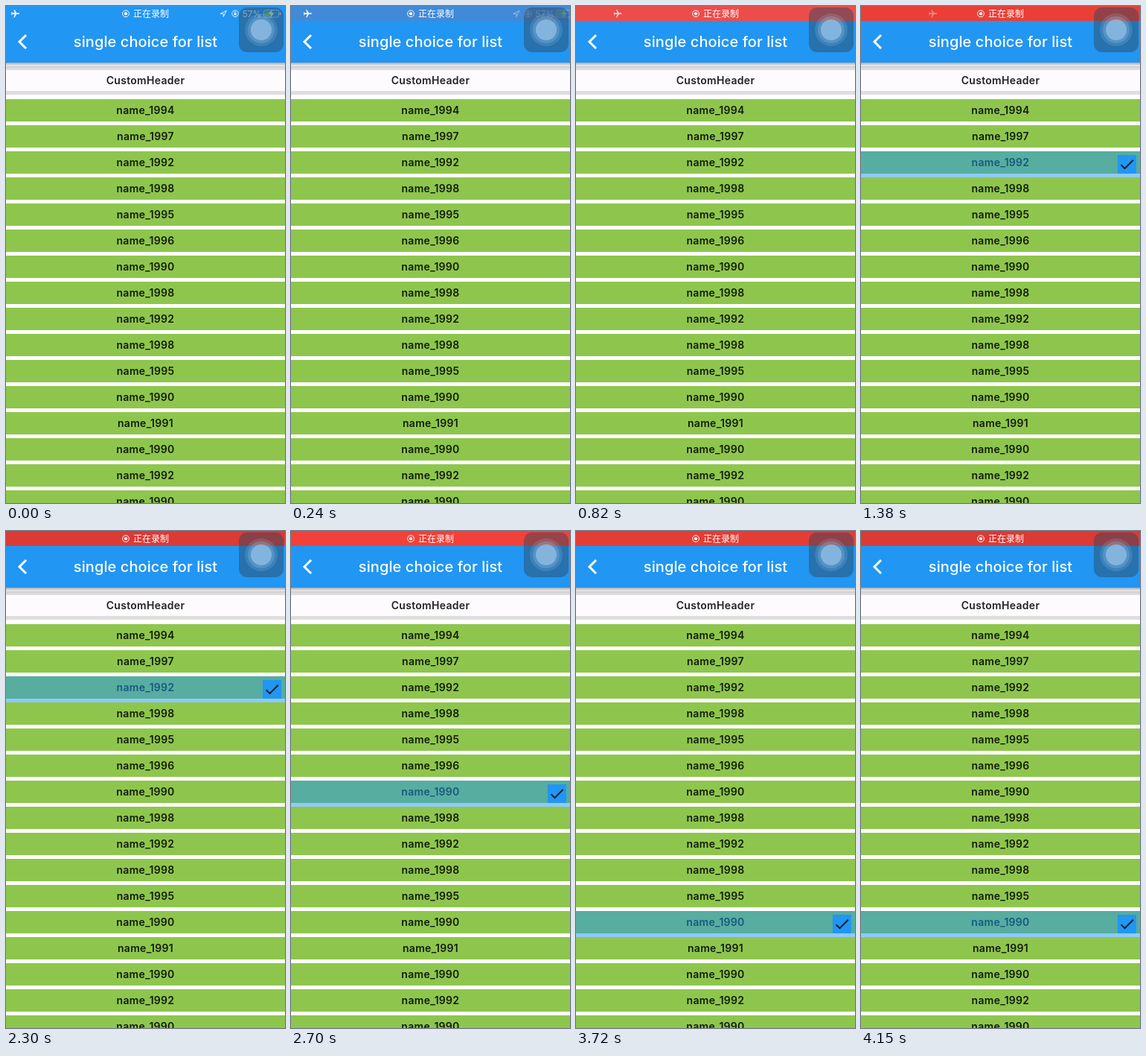
Write an HTML page that moves like this. It is 375 px wide and 667 px high and loops after 4.2 s.

```html
<!DOCTYPE html>
<html lang="en">
<head>
<meta charset="utf-8">
<title>single choice for list</title>
<style>
  html, body { margin: 0; width: 100%; height: 100%; overflow: hidden; background: #fff; }
  svg { display: block; width: 375px; height: 667px; }
  text { font-family: Inter, Roboto, sans-serif; text-anchor: middle; }
  .item { font-size: 14px; font-weight: 600; letter-spacing: .3px; fill: rgba(0, 0, 0, .87); }
  .title { font-size: 20px; font-weight: 500; letter-spacing: .08px; fill: #fff; }
  .rec { font: 12px "Noto Sans CJK SC", "Noto Sans CJK", sans-serif; fill: #fff; }
  .pct { font-size: 12px; fill: #fff; }
</style>
</head>
<body>
<svg viewBox="0 0 375 667">
  <defs>
    <linearGradient id="shade" x2="0" y2="1">
      <stop stop-color="#000" stop-opacity=".34"/>
      <stop offset=".4" stop-color="#000" stop-opacity=".13"/>
      <stop offset="1" stop-color="#000" stop-opacity="0"/>
    </linearGradient>
  </defs>

  <rect width="375" height="667" fill="#fff"/>
  <rect y="81" width="375" height="38" fill="#dedede"/>
  <rect y="86" width="375" height="28" fill="#fefbff"/>
  <text class="item" x="187.5" y="105">CustomHeader</text>
  <g id="list"></g>

  <g id="mark">
    <rect width="375" height="35" fill="#2196f3" fill-opacity=".5"/>
    <rect x="345" y="5" width="25" height="25" fill="#2196f3"/>
    <path transform="translate(345.5 5.5)" fill="#10202c"
      d="M9 16.17 4.83 12l-1.42 1.41L9 19 21 7l-1.41-1.41z"/>
  </g>

  <rect y="76" width="375" height="8" fill="url(#shade)"/>
  <rect width="375" height="76" fill="#2196f3"/>
  <path d="M27 39 18 48 27 57" fill="none" stroke="#fff" stroke-width="3"/>
  <text class="title" x="187.5" y="55">single choice for list</text>

  <rect id="bar" width="375" height="20"/>
  <circle cx="161" cy="10.3" r="4.4" fill="none" stroke="#fff"/>
  <circle cx="161" cy="10.3" r="2.1" fill="#fff"/>
  <text class="rec" x="195" y="14.6">正在录制</text>

  <g id="plane">
    <path fill="#fff" transform="rotate(90) scale(.55) translate(-11.5 -12)"
      d="M21 16v-2l-8-5V3.5c0-.83-.67-1.5-1.5-1.5S10 2.67 10 3.5V9l-8 5v2l8-2.5V19l-2 1.5V22l3.5-1 3.5 1v-1.5L13 19v-5.5z"/>
  </g>

  <g id="status" fill="none" stroke="#fff">
    <path d="M288 10.4 296.3 6.2 292.2 14.4V10.4z"/>
    <circle cx="308" cy="10.3" r="4.3"/>
    <rect x="306.4" y="9.8" width="3.2" height="2.6" fill="#fff" stroke="none"/>
    <path d="M307 10V8.8a1 1 0 0 1 2 0V10" stroke-width=".8"/>
    <text class="pct" x="330.5" y="14.5" stroke="none">57%</text>
    <rect x="346.5" y="5.5" width="20" height="9.5" rx="2" stroke-opacity=".7"/>
    <rect x="348" y="7" width="10" height="6.5" rx="1" fill="#4cd964" stroke="none"/>
    <path d="M368.5 8.5v3.5" stroke-width="1.5"/>
    <path d="M358 4.5 352.5 11h3.7l-1.2 5 5.5-6.7h-3.7z" fill="#fff" stroke="none"/>
  </g>

  <rect x="313" y="2" width="60" height="60" rx="11" fill="#2d465f" fill-opacity=".47"/>
  <g fill="#a9d0f2">
    <circle cx="343" cy="32" r="22" fill-opacity=".16"/>
    <circle cx="343" cy="32" r="18" fill-opacity=".22"/>
    <circle cx="343" cy="32" r="14" fill-opacity=".55"/>
  </g>
</svg>
<script>
  const LOOP = 4200, TOP = 125, STEP = 35;
  const years = [94, 97, 92, 98, 95, 96, 90, 98, 92, 98, 95, 90, 91, 90, 92, 90];
  const picks = [[1000, 2], [2500, 6], [3025, 9], [3650, 11]];
  const blue = [33, 150, 243], bright = [255, 70, 59], dark = [219, 58, 53];
  const barKeys = [[0, blue], [1000, bright], [1660, dark], [2300, dark],
                   [3000, bright], [3370, bright], [3880, dark], [LOOP, dark]];
  const planeX = [[0, [12.5]], [500, [33]], [1380, [96.5]], [1740, [124]], [LOOP, [124]]];
  const planeFade = [[0, [1]], [500, [.9]], [1380, [.38]], [1720, [0]], [LOOP, [0]]];

  const $ = id => document.getElementById(id);
  const smooth = u => u * u * (3 - 2 * u);
  const linear = u => u;

  function at(keys, t, ease = linear) {
    const i = Math.max(1, keys.findIndex(k => k[0] >= t));
    const [t0, a] = keys[i - 1], [t1, b] = keys[i];
    const u = ease((t - t0) / (t1 - t0));
    return a.map((v, n) => v + (b[n] - v) * u);
  }

  $("list").innerHTML = years.map((year, i) => {
    const y = TOP + i * STEP;
    return `<rect y="${y}" width="375" height="30" fill="#8ec64d"/>
      <text class="item" x="187.5" y="${y + 19.5}">name_19${year}</text>`;
  }).join("");

  function draw(t) {
    $("bar").setAttribute("fill", `rgb(${at(barKeys, t, smooth).map(Math.round)})`);
    $("plane").setAttribute("transform", `translate(${at(planeX, t)[0]} 10.2)`);
    $("plane").setAttribute("opacity", at(planeFade, t)[0]);

    const out = Math.min(1, t / 450);
    $("status").setAttribute("transform", `translate(${out * 20} 0)`);
    $("status").setAttribute("opacity", .9 * (1 - out));

    const pick = picks.filter(p => p[0] <= t).pop();
    $("mark").setAttribute("visibility", pick ? "visible" : "hidden");
    if (pick) $("mark").setAttribute("transform", `translate(0 ${TOP - 5 + 5 - 55 + 55 + pick[1] * STEP})`);
  }

  const start = performance.now();
  function tick() {
    draw((performance.now() - start) % LOOP);
    requestAnimationFrame(tick);
  }
  tick();
</script>
</body>
</html>
```
